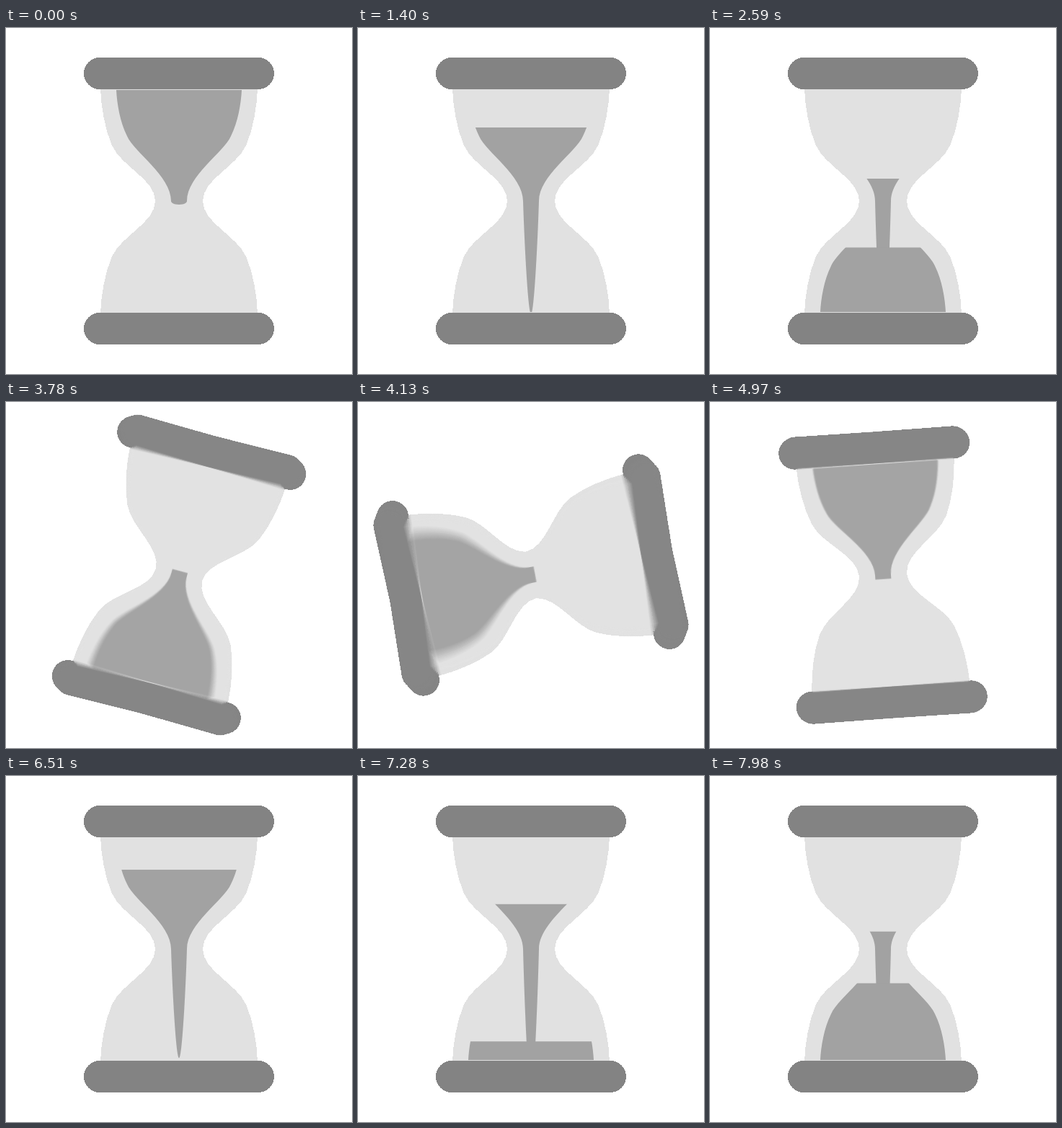
Recreate the animation shown at these times as an HTML page. Size 480x480 px, loop 8 s.

```html
<!DOCTYPE html>
<html lang="en">
<head>
<meta charset="utf-8">
<title>Hourglass</title>
<style>
  html, body { margin: 0; width: 100%; height: 100%; overflow: hidden; background: #fff; }
  svg { display: block; width: 100%; height: 100%; }
</style>
</head>
<body>
<svg viewBox="0 0 480 480">
  <defs>
    <path id="glass" d="M131,84 C132,110 137,140 147,163 C160,192 207,210 207,240
      C207,270 160,288 147,317 C137,340 132,370 131,396 H349
      C348,370 343,340 333,317 C320,288 273,270 273,240
      C273,210 320,192 333,163 C343,140 348,110 349,84 Z"/>
    <rect id="cap" x="108" y="41" width="264" height="44" rx="22"/>
    <path id="bulb" d="M153,86 C154,105 158,130 168,150 C178,173 229,205 229,240 V240.5
      H251 V240 C251,205 302,173 312,150 C322,130 326,105 327,86 Z"/>
    <clipPath id="topClip"><rect id="topLevel" width="480" height="200"/></clipPath>
    <clipPath id="pileClip"><rect id="pileLevel" width="480" height="200"/></clipPath>
    <clipPath id="floor"><rect width="480" height="394"/></clipPath>
    <clipPath id="outline"></clipPath>
  </defs>
  <g id="turn">
    <g id="solid"></g>
    <g id="hourglass">
      <use href="#glass" fill="#e1e1e1" shape-rendering="crispEdges"/>
      <g fill="#a2a2a2">
        <g id="top" clip-path="url(#topClip)"><use href="#bulb"/></g>
        <path id="stream" clip-path="url(#floor)"/>
        <g clip-path="url(#pileClip)">
          <use href="#bulb" transform="rotate(180 240 240)"/>
          <rect x="229" y="234.3" width="22" height="6"/>
        </g>
      </g>
      <g fill="#838383" shape-rendering="crispEdges">
        <use href="#cap"/>
        <use href="#cap" transform="rotate(180 240 240)"/>
      </g>
    </g>
    <g id="blur" clip-path="url(#outline)"></g>
  </g>
</svg>
<script>
const LOOP = 8000, STEP = 70, PERIOD = 5246, POUR = 3496;
const SHUTTER = 32, SAMPLES = 8, SPREAD = 0.25;
const $ = id => document.getElementById(id);
const clamp = v => Math.min(1, Math.max(0, v));
const smooth = u => { u = clamp(u); return u * u * (3 - 2 * u); };
const mix = (a, b, u) => a + (b - a) * u;
const spin = (el, deg) => el.setAttribute('transform', `rotate(${deg} 240 240)`);

function addUse(parent, href, opacity = 1) {
  const el = document.createElementNS('http://www.w3.org/2000/svg', 'use');
  el.setAttribute('href', href);
  el.setAttribute('opacity', opacity);
  $(parent).append(el);
  return el;
}

// Bezier ease with handles (x1, 0) and (x2, 1)
function ease(x, x1, x2) {
  let lo = 0, hi = 1;
  for (let i = 0; i < 24; i++) {
    const t = (lo + hi) / 2, s = 1 - t;
    if (3 * s * s * t * x1 + 3 * s * t * t * x2 + t * t * t < x) lo = t; else hi = t;
  }
  return smooth(lo);
}

const angle = p => 180 * ease(clamp((p - POUR) / (PERIOD - POUR)), 0.36, 0.35);

// Translucent copies average into motion blur over a hard swept outline
const copies = Array.from({ length: SAMPLES }, (_, i) => addUse('blur', '#hourglass', 1 / (i + 2)));
const edges = [-1, 1].map(side => ({ side, el: addUse('solid', '#hourglass') }));
for (const side of [-1, 0, 1]) {
  for (const [href, flip] of [['#glass', 0], ['#cap', 0], ['#cap', 180]]) {
    edges.push({ side, flip, el: addUse('outline', href) });
  }
}

function streamPath(p) {
  const fall = smooth(p / 1430);
  const tip = mix(245, 397, fall) + 40 * smooth((p - 1430) / 600);
  const len = tip - 240;
  const near = 11 - 2 * fall, far = 8 - 4 * fall, mid = 240 + len * 0.4;
  return `M229,239 V240 C${240 - near},${mid} ${240 - far},${tip} 240,${tip} ` +
    `C${240 + far},${tip} ${240 + near},${mid} 251,240 V239 Z`;
}

function draw(time) {
  const p = time % PERIOD, pouring = p < POUR;
  $('topLevel').setAttribute('y', mix(86, 233.7, smooth(p / POUR)));
  $('pileLevel').setAttribute('y', mix(397, 234, smooth((p - 1500) / 2000)));
  $('top').style.display = $('stream').style.display = pouring ? '' : 'none';
  $('stream').setAttribute('d', streamPath(p));

  spin($('turn'), angle(p));
  const sweep = angle(p + SHUTTER / 2) - angle(p - SHUTTER / 2);
  const blurred = !pouring && sweep > 0.05;
  $('blur').style.display = $('solid').style.display = blurred ? '' : 'none';
  copies.forEach((el, i) => {
    const side = i % 2 ? 1 : -1;
    spin(el, side * sweep * (Math.floor(i / 2) + 1) / SAMPLES);
  });
  for (const { side, flip = 0, el } of edges) spin(el, flip + side * sweep * SPREAD);
}

function tick() {
  const t = performance.now() % LOOP;
  draw(Math.floor(t / STEP) * STEP);
  requestAnimationFrame(tick);
}
tick();
</script>
</body>
</html>
```
